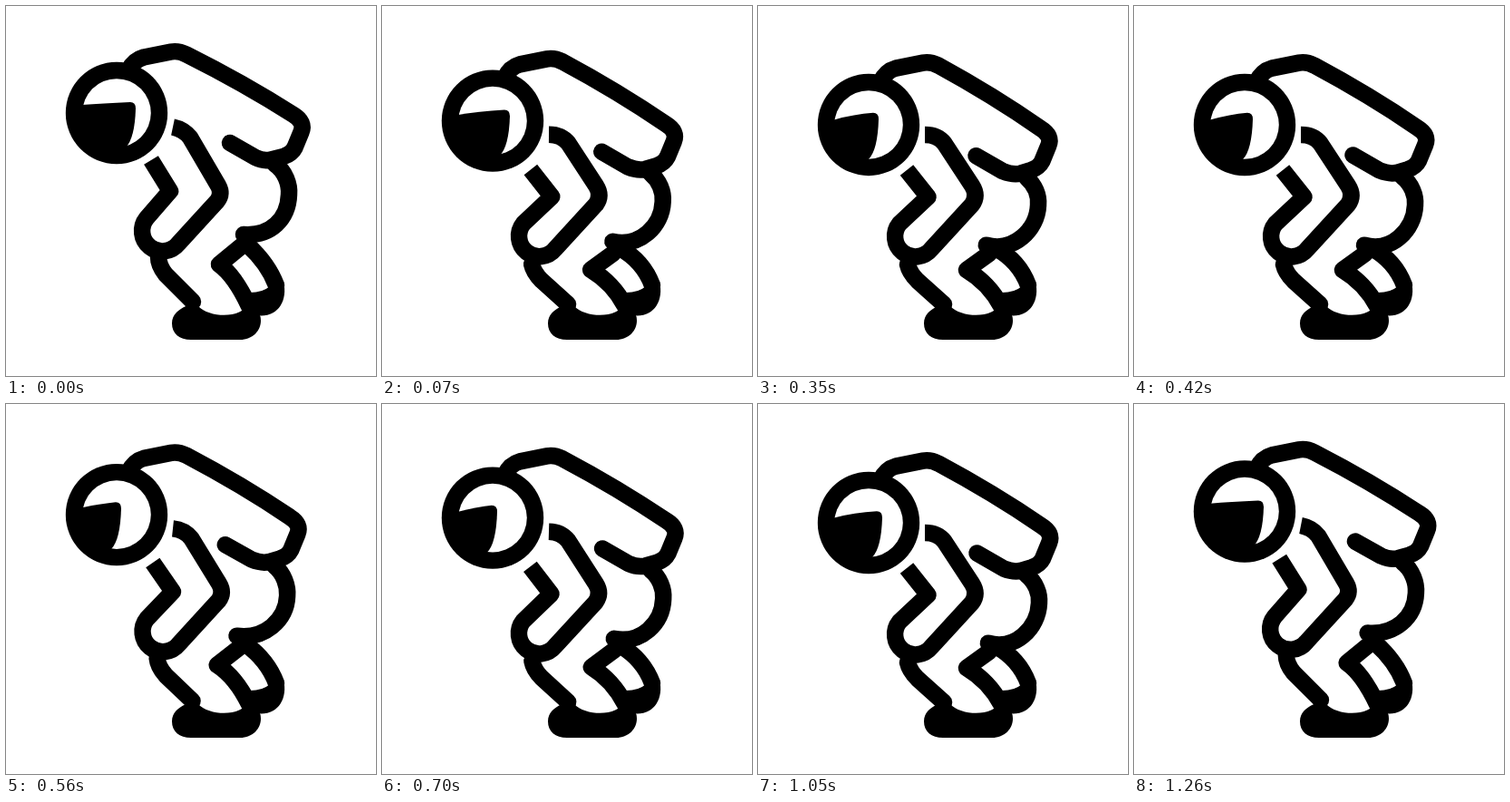
An HTML page for the animation above (1330 ms loop, 408 by 408 pixels).

```html
<!DOCTYPE html>
<html lang="en">
<head>
<meta charset="utf-8">
<style>
  html, body { margin: 0; width: 100%; height: 100%; overflow: hidden; background: #fff; }
  svg { display: block; width: 100vw; height: 100vh; }
  .line { fill: none; stroke: #000; stroke-width: 18.5; stroke-linejoin: round; stroke-linecap: round; }
  #arm { stroke-linecap: butt; }
</style>
</head>
<body>
<svg viewBox="0 0 408 408">
  <path d="M205 328C190 334 183 340 183 350C183 361 191 368 204 368H258C272 368 281 358 281 347C281 338 276 332 266 328C263 344 225 345 212 331Z"/>
  <path d="M269 316Q283 316 291 309L306 304C311 325 300 342 281 341.5L268 338Z"/>
  <path class="line" id="shin"/>
  <path class="line" id="knee"/>
  <path class="line" id="calf"/>
  <path class="line" id="hip"/>
  <path class="line" id="back"/>
  <path class="line" id="arm"/>
  <g id="head">
    <circle r="56.2"/>
    <circle r="37.8" fill="#fff"/>
    <path id="visor"/>
  </g>
</svg>
<script>
const STEP = 70, COUNT = 19;
const CYCLE = 9.2, HELD = 6; // steps per bob, steps until the body rises again

const el = id => document.getElementById(id);
const draw = (id, d) => el(id).setAttribute("d", d);
const mix = (a, b, k) => a + (b - a) * k;
const smooth = x => x * x * (3 - 2 * x);

// Fast drop, one bounce of the hips while down, smooth rise; the sway returns late.
function motionAt(phase) {
  const press = 1 - Math.exp(-1.1 * phase);
  const rise = Math.max(0, (phase - HELD) / (CYCLE - HELD));
  const bounce = rise ? 0 : Math.sin(Math.PI * phase / HELD) ** 2;
  return { drop: 13 * press * (1 - smooth(rise)), sway: press * (1 - rise ** 6), bounce };
}

function drawBack(drop, waist, lean) {
  const top = y => y + drop - 0.8 * Math.min(1, -lean / 3);
  const x = v => v + lean, y = v => v + waist;
  draw("back", `M135 ${71 + drop}Q141 ${top(59.5)} 152 ${top(56.5)}
    L182 ${top(50.5)}Q190 ${top(49)} 199 ${top(53.5)}
    Q${262 + lean / 2} ${mix(top(85), y(85), 0.5)} ${x(317)} ${y(120)}
    Q${x(330)} ${y(128)} ${x(325.5)} ${y(139)}
    L${x(318.5)} ${y(156)}Q${x(315)} ${y(163)} ${x(306)} ${y(166)}
    L${292 + lean / 2} ${y(169.5)}Q${284 + lean / 2} ${y(171.5)} ${x(275)} ${y(167)}
    L${247 + lean * 1.25} ${151 + waist * 0.94}`);
}

function drawHip(drop, waist, sway, bounce) {
  const x = 262 - 8 * sway - 9 * bounce, y = 252 + 0.9 * drop;
  const right = 312 - 2 * sway - 4 * bounce, mid = 208 + 0.9 * drop;
  draw("hip", `M296 ${174 + waist}C${right - 4} ${182 + waist} ${right + 1} ${mid - 11} ${right} ${mid}
    C${right - 1} ${mid + 27} ${x + 30} ${y + 2 + drop / 2} ${x} ${y}`);
}

function drawLimbs(k) {
  const m = (a, b) => mix(a, b, k);
  const cx = m(172, 173), cy = m(248, 254);
  draw("arm", `M184 ${m(133.5, 142)}Q${m(196, 198)} ${m(136, 142)} ${m(203, 205.5)} ${m(145, 151.5)}
    L${m(234, 236)} ${m(198, 198)}Q${m(239, 243)} ${m(207, 209)} ${m(233, 236)} ${m(215, 219)}
    L${cx + 18} ${cy + 14}A22 22 0 1 1 ${cx - 17} ${cy - 14}
    L${m(181, 187.5)} ${m(204, 210.5)}L${m(160, 164)} ${m(170, 181)}`);
  draw("shin", `M${m(168, 165)} ${m(276, 285)}Q${m(168, 167)} ${m(286, 294)} 176 ${m(296, 303)}L${m(206, 205)} ${m(326, 329)}`);
  draw("knee", `M${m(263, 255)} ${m(262, 273)}L${m(235, 230)} ${m(285, 291)}Q${m(252, 255)} ${m(297, 306)} 268 331`);
  draw("calf", `M${m(266, 262)} ${m(263, 267)}Q${m(289, 288)} ${m(284, 281)} 298 308`);
}

function drawHead(drop, turn) {
  el("head").setAttribute("transform", `translate(122 ${118 + drop})`);
  const left = mix(-9, -5.5, drop / 13);
  const x = 3 + 18 * turn, y = -14 + 2 * turn;
  draw("visor", `M-42 ${left + 1}L-38 ${left}Q-16 ${y + 1.5} ${x - 6} ${y}
    Q${x} ${y} ${x} ${y + 7}Q${x - 1} 28 ${x - 11} 38L-16 42L-40 22Z`);
}

function render(i) {
  const { drop, sway, bounce } = motionAt(i % CYCLE);
  const waist = 1.1 * drop + 3.5 * bounce;
  drawBack(drop, waist, -4.4 * sway - 3.3 * bounce);
  drawHip(drop, waist, sway, bounce);
  drawLimbs(Math.min(1, drop / 9));
  drawHead(drop, Math.abs(9 - i) / 9);
}

const start = performance.now();
function tick() {
  render(Math.floor((performance.now() - start) / STEP) % COUNT);
  requestAnimationFrame(tick);
}
tick();
</script>
</body>
</html>
```
